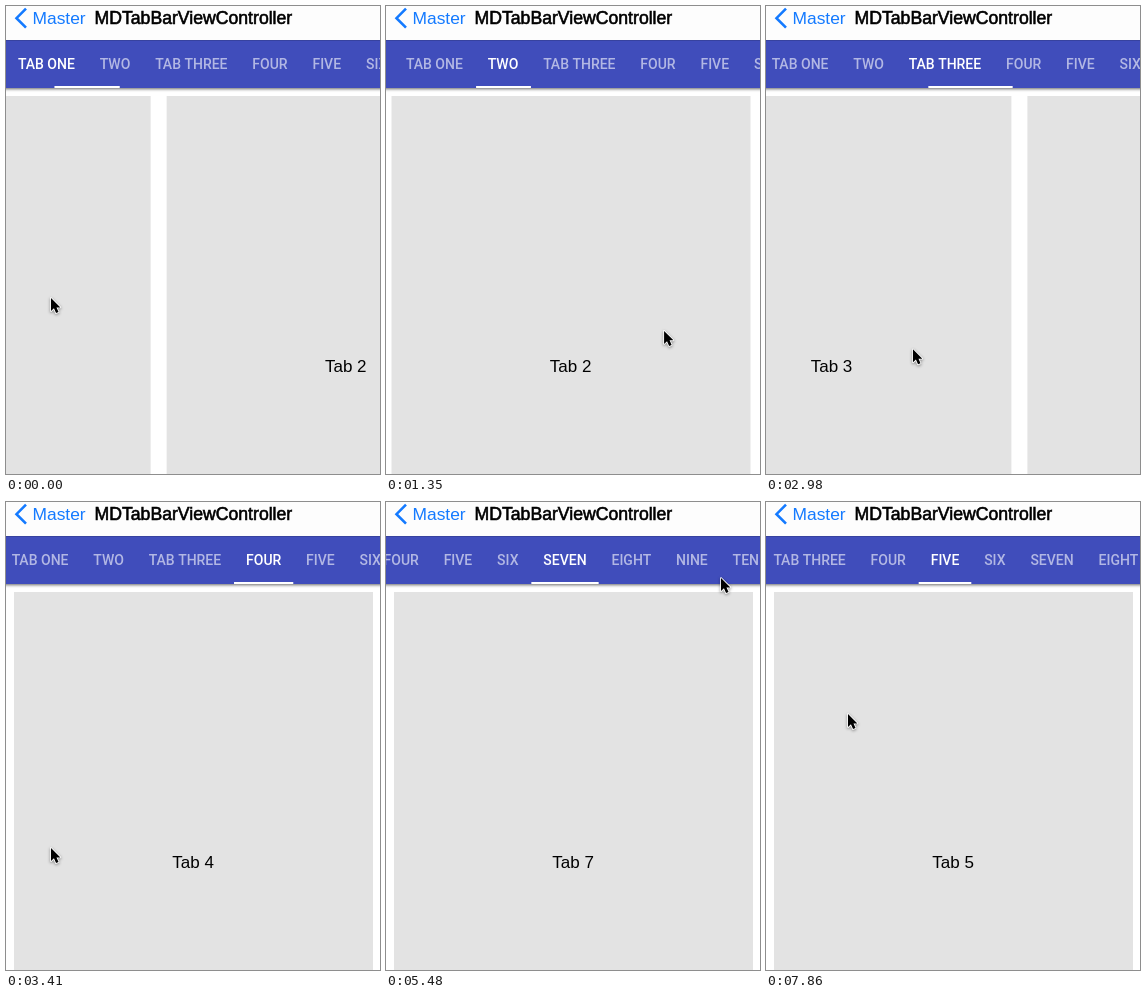
An HTML page with a canvas for the animation above (8 s loop, 374 px wide and 468 px high).

```html
<!DOCTYPE html>
<html lang="en">
<head>
<meta charset="utf-8">
<title>Tab bar</title>
<style>
  html, body { margin: 0; width: 100%; height: 100%; overflow: hidden; background: #fff; }
  canvas { display: block; }
</style>
</head>
<body>
<canvas id="stage" width="374" height="468"></canvas>
<script>
const ctx = document.getElementById('stage').getContext('2d');
const W = 374, H = 468, LOOP = 8000;
const BAR_TOP = 34, BAR_BOTTOM = 82;
const PAGE_STEP = 375, PAGE_TOP = 90, PAGE_WIDTH = 359;
const INSET = 8, PADDING = 24, GAP = .85;
const SANS = '"Liberation Sans", Arial, sans-serif';
const TAB_FONT = '500 14px Roboto, sans-serif';

// Gestures: a swipe drags the page part of the way, then it settles.
const DRAG = 320, SETTLE = 280, REACH = .593, SCROLL = 300, RIPPLE = 270;
const swipes = [{ at: 280, tab: 1 }, { at: 1930, tab: 2 }, { at: 3410, tab: 3 }];
const taps = [{ at: 5180, tab: 6 }, { at: 6390, tab: 9 }, { at: 7400, tab: 4 }];
const visits = [...swipes, ...taps];

// Cursor stops: arrival time, x, y. Each move lasts at most MOVE.
const MOVE = 600;
const stops = [
  [0, 45, 292], [1333, 280, 325], [1650, 49, 318], [2810, 270, 340], [3130, 45, 346],
  [4600, 319, 64], [4900, 333, 66], [5480, 335, 76], [6390, 345, 62],
  [6820, 215, 89], [7400, 56, 60], [7860, 82, 212]
];

const mix = (a, b, u) => a + (b - a) * u;
const smooth = u => u * u * (3 - 2 * u);
const out = u => 1 - (1 - u) ** 3;
const clamp = (v, lo, hi) => Math.min(hi, Math.max(lo, v));
const ramp = (t, from, length) => clamp((t - from) / length, 0, 1);

// Segments are as wide as their text plus padding.
ctx.font = TAB_FONT;
let edge = 0;
const tabs = ['ONE', 'TWO', 'THREE', 'FOUR', 'FIVE', 'SIX', 'SEVEN', 'EIGHT', 'NINE', 'TEN'].map((word, i) => {
  const name = i === 0 || i === 2 ? 'TAB ' + word : word;
  const width = ctx.measureText(name).width + PADDING;
  const tab = { name, left: edge, right: edge + width, center: edge + width / 2 };
  edge += width + GAP;
  return tab;
});
const maxScroll = tabs[9].right + 3 - W;

const pagePos = t => swipes.reduce((pos, { at }) => pos
  + REACH * smooth(ramp(t, at - SETTLE - DRAG, DRAG))
  + (1 - REACH) * out(ramp(t, at - SETTLE, SETTLE)), 0);

// The selected tab scrolls to the middle of the bar.
const scrollAt = t => visits.reduce((x, { at, tab }) => {
  const goal = clamp(tabs[tab].center + INSET - W / 2, -INSET, maxScroll);
  return mix(x, goal, smooth(ramp(t, at, SCROLL)));
}, 0);

function indicatorAt(t, side) {
  const pos = pagePos(t), i = Math.floor(pos);
  const swiped = mix(tabs[i][side], tabs[i + 1][side], pos - i);
  return taps.reduce((x, { at, tab }) => mix(x, tabs[tab][side], smooth(ramp(t, at, RIPPLE))), swiped);
}

const cursorAt = t => stops.reduce(([x, y], [at, toX, toY], i) => {
  const length = i ? Math.min(MOVE, at - stops[i - 1][0]) : 1;
  const u = smooth(ramp(t, at - length, length));
  return [mix(x, toX, u), mix(y, toY, u)];
}, [0, 0]);

function rect(x, y, w, h, color) {
  ctx.fillStyle = color;
  ctx.fillRect(x, y, w, h);
}

function text(str, x, y, font, color, align = 'left') {
  ctx.font = font;
  ctx.textAlign = align;
  ctx.fillStyle = color;
  ctx.fillText(str, x, y);
}

function drawPages(pos) {
  for (let i = Math.floor(pos); i <= Math.ceil(pos); i++) {
    const x = (i - pos) * PAGE_STEP + INSET;
    rect(x, PAGE_TOP, PAGE_WIDTH, H - PAGE_TOP, '#e3e3e3');
    text('Tab ' + (i + 1), x + PAGE_WIDTH / 2 - .4, 365.5, '17px ' + SANS, '#000', 'center');
  }
}

function drawRipple(t, { at, tab }) {
  const u = (t - at) / RIPPLE;
  if (u < 0 || u >= 1) return;
  const { left, right } = tabs[tab], [x, y] = cursorAt(at);
  ctx.save();
  ctx.beginPath();
  ctx.rect(left, BAR_TOP, right - left, BAR_BOTTOM - BAR_TOP);
  ctx.clip();
  ctx.beginPath();
  ctx.arc(x + scrollAt(at), y, 8 + 52 * out(u), 0, 7);
  ctx.fillStyle = `rgba(255,255,255,${.2 * (1 - u)})`;
  ctx.fill();
  ctx.restore();
}

function drawBar(t, selected) {
  ctx.save();
  ctx.shadowColor = 'rgba(0,0,0,.6)';
  ctx.shadowBlur = 3;
  ctx.shadowOffsetY = 1;
  rect(-5, BAR_TOP, W + 10, BAR_BOTTOM - BAR_TOP, '#404dbb');
  ctx.restore();

  ctx.save();
  ctx.translate(-scrollAt(t), 0);
  taps.forEach(tap => drawRipple(t, tap));
  tabs.forEach(({ name, center }, i) =>
    text(name, center, 63, TAB_FONT, i === selected ? '#fff' : 'rgba(255,255,255,.6)', 'center'));
  const left = indicatorAt(t, 'left');
  rect(left, 80, indicatorAt(t, 'right') - left, 2, '#fff');
  ctx.restore();
}

function drawNav() {
  rect(0, 0, W, BAR_TOP, '#fdfdfd');
  rect(0, BAR_TOP, W, .5, 'rgba(0,0,0,.3)');
  ctx.strokeStyle = '#147aff';
  ctx.lineWidth = 2.6;
  ctx.stroke(new Path2D('M20 2.7 L10.5 12.2 L20 21.7'));
  text('Master', 26.5, 18, '17.4px ' + SANS, '#147aff');
  const title = 'MDTabBarViewController';
  text(title, 88.5, 18, '17.65px ' + SANS, '#000');
  ctx.strokeStyle = '#000';
  ctx.lineWidth = .6;
  ctx.strokeText(title, 88.5, 18);
}

const arrow = new Path2D('M0 0 V14.2 L3.2 11.2 L5.5 16.4 L8.2 15.2 L6 10.2 H10.2 Z');
function drawCursor([x, y]) {
  ctx.save();
  ctx.translate(x, y);
  ctx.scale(.92, .92);
  ctx.lineJoin = 'round';
  ctx.lineWidth = 1.8;
  ctx.strokeStyle = '#fff';
  ctx.shadowColor = 'rgba(0,0,0,.45)';
  ctx.shadowBlur = 3;
  ctx.shadowOffsetY = 1;
  ctx.stroke(arrow);
  ctx.shadowColor = 'transparent';
  ctx.fillStyle = '#000';
  ctx.fill(arrow);
  ctx.restore();
}

function draw(t) {
  const selected = visits.reduce((tab, visit) => t >= visit.at ? visit.tab : tab, 0);
  rect(0, 0, W, H, '#fff');
  drawPages(t < taps[0].at ? pagePos(t) : selected);
  drawBar(t, selected);
  drawNav();
  drawCursor(cursorAt(t));
}

let start;
function tick(now) {
  start ??= now;
  draw(Math.max(0, now - start) % LOOP);
  requestAnimationFrame(tick);
}
draw(0);
requestAnimationFrame(tick);
</script>
</body>
</html>
```
